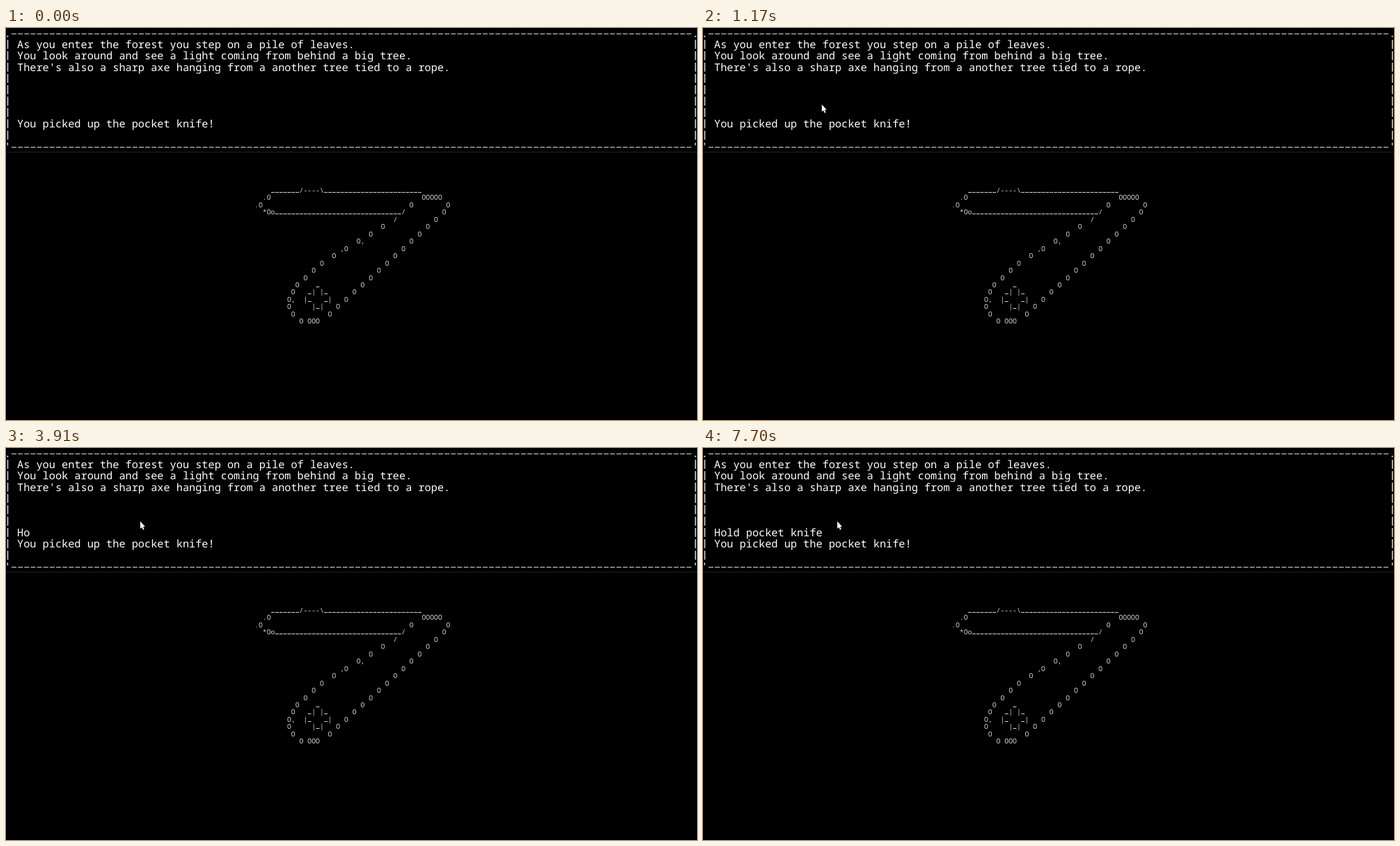
An HTML page with a canvas for the animation above (8000 ms loop, 993 px wide and 564 px high).

```html
<!DOCTYPE html>
<html lang="en">
<head>
<meta charset="utf-8">
<title>Forest adventure</title>
<style>
  html, body { margin: 0; width: 100%; height: 100%; overflow: hidden; background: #000; }
  canvas { display: block; }
</style>
</head>
<body>
<canvas id="stage" width="993" height="564"></canvas>
<script>
const ctx = document.getElementById('stage').getContext('2d');
const LOOP = 8000;
const storyGrid = { size: 15.25, x: 16, y: 29, col: 9.15, row: 16.33, color: '#fff' };
const knifeGrid = { size: 9.77, x: 357.1, y: 237, col: 5.862, row: 10.46, color: '#d4d4d4' };

const story = [
  'As you enter the forest you step on a pile of leaves.',
  'You look around and see a light coming from behind a big tree.',
  "There's also a sharp axe hanging from a another tree tied to a rope."
];
// Typing bursts: text, start, time per key
const bursts = [['H', 3100, 200], ['old ', 3910, 200], ['pocket ', 4840, 228], ['knife', 6710, 247]];
const arrow = new Path2D('M0 0V10.4L2.3 8.4L4 12.2L5.6 11.5L4.1 7.7H7Z');

const lerp = (a, b, k) => a + (b - a) * k;

function useGrid(grid) {
  ctx.font = grid.size + 'px "Noto Sans Mono", "DejaVu Sans Mono", monospace';
  ctx.textRendering = 'geometricPrecision';
  ctx.fillStyle = grid.color;
}

// Writes on the cells of a grid; underscores are short separate bars
function put(grid, col, row, text) {
  const y = grid.y + row * grid.row;
  [...text].forEach((ch, i) => {
    const x = grid.x + (col + i) * grid.col;
    if (ch === '_') ctx.fillRect(x + 0.5, Math.round(y - 1), grid.col - 1, 1);
    else if (ch !== ' ') ctx.fillText(ch, x, y);
  });
}

function dashes(x1, y1, x2, y2, length, step, width) {
  ctx.lineWidth = width;
  ctx.setLineDash([length, step - length]);
  ctx.beginPath();
  ctx.moveTo(x1, y1);
  ctx.lineTo(x2, y2);
  ctx.stroke();
  ctx.setLineDash([]);
}

function drawBorder() {
  const { col, row } = storyGrid;
  ctx.strokeStyle = '#ddd';
  for (const y of [8.5, 171.5]) dashes(8, y, 985, y, 7, col, 1);
  for (const side of [0, 108]) {
    const x = 2.5 + side * col;
    dashes(x, 17, x, 161, 13, row, 1.5);
    put(storyGrid, side - 2, -1, '.');
    put(storyGrid, side - 2, 9, "'");
  }
  ctx.fillStyle = '#222';
  ctx.fillRect(0, 178, 993, 1);
}

function typed(t) {
  return bursts.map(([text, start, gap]) =>
    text.slice(0, Math.max(0, Math.floor((t - start) / gap) + 1))).join('');
}

function drawStory(t) {
  useGrid(storyGrid);
  story.forEach((text, row) => put(storyGrid, 0, row, text));
  put(storyGrid, 0, 6, typed(t));
  put(storyGrid, 0, 7, 'You picked up the pocket knife!');
  drawBorder();
}

// Left edge of the handle: a slope that ends in a round butt
function handleLeft(row) {
  if (row < 12) return Math.max(46 - 3 * row, 36 - 2 * row);
  return Math.round(8 + 0.35 * (row - 15.5) ** 2);
}

function drawKnife() {
  useGrid(knifeGrid);
  const at = (col, row, text) => put(knifeGrid, col, row, text);
  // Blade
  at(4, 0, '_______/----\\' + '_'.repeat(24));
  at(2, 1, '.O');
  at(0, 2, '.O');
  at(2, 3, '*Oo' + '_'.repeat(31) + '/');
  at(34, 4, '/');
  // Handle
  at(41, 1, 'OOOOO');
  at(38, 2, 'O');
  at(47, 2, 'O');
  for (let row = 3; row < 18; row++) at(52 - 2 * row, row, 'O');
  for (let row = 5; row < 18; row++) at(handleLeft(row), row, 'O');
  at(11, 18, 'O OOO');
  at(26, 7, ',');
  at(21, 8, ',');
  at(9, 15, ',');
  // Cross
  at(15, 13, '_');
  at(13, 14, '_| |_');
  at(12, 15, '|_   _|');
  at(14, 16, '|_|');
}

// The pointer sweeps in, slows down, drifts up and settles to the right
function pointerAt(step) {
  const left = 1 - step / 11;
  if (left >= 0) return [181 + 766 * left ** 2.4, 122 + 426 * left ** 1.92];
  if (step <= 16) {
    const k = (step - 11) / 5;
    return [lerp(181, 165, k ** 2), lerp(122, 107, k)];
  }
  const k = Math.min(1, Math.max(0, (step - 18) / 3));
  return [lerp(165, 193, k), lerp(107, 105.5, k)];
}

function drawPointer(t) {
  if (t < 130) return;
  ctx.save();
  ctx.translate(...pointerAt(Math.floor((t - 125) / 69)));
  ctx.strokeStyle = '#000';
  ctx.lineWidth = 2;
  ctx.stroke(arrow);
  ctx.fillStyle = '#fff';
  ctx.fill(arrow);
  ctx.restore();
}

function draw(t) {
  ctx.fillStyle = '#000';
  ctx.fillRect(0, 0, 993, 564);
  drawStory(t);
  drawKnife();
  drawPointer(t);
}

let start;
function tick(now) {
  start ??= now;
  draw((now - start) % LOOP);
  requestAnimationFrame(tick);
}
requestAnimationFrame(tick);
</script>
</body>
</html>
```
